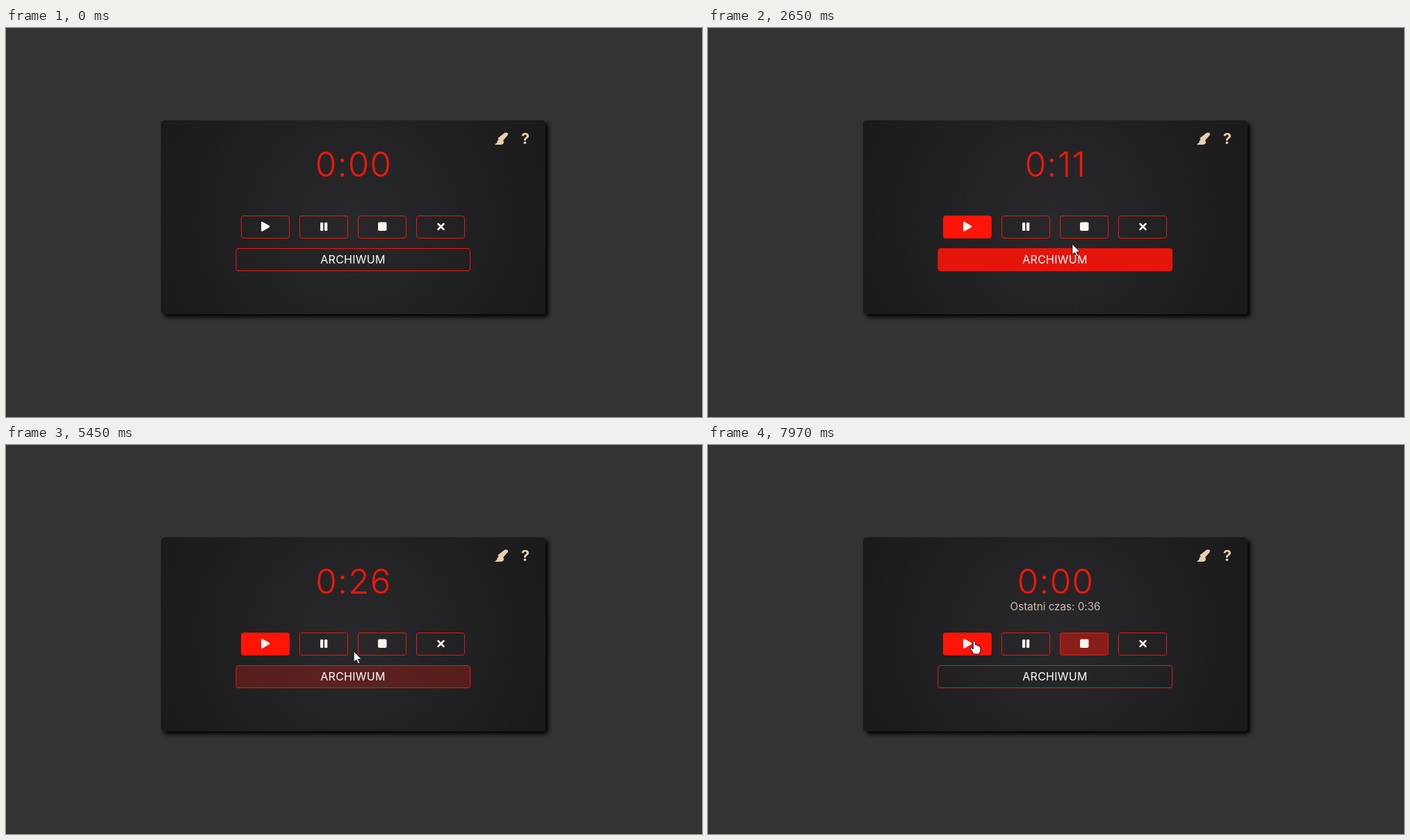
Animation of 1001x560 px, one loop 8000 ms. Source, as an HTML page:

```html
<!DOCTYPE html>
<html lang="pl">
<head>
<meta charset="utf-8">
<title>Stoper</title>
<style>
  html, body { margin: 0; width: 100%; height: 100%; overflow: hidden; background: #333; }
  svg { position: absolute; left: 0; top: 0; }
  text { font-family: Inter, sans-serif; text-anchor: middle; }
  #panel {
    position: absolute; left: 223px; top: 133px; width: 553px; height: 279px;
    border-radius: 5px; box-shadow: 4px 4px 6px #000;
    background: radial-gradient(circle, #29292c, #1a1a1a);
  }
  #clock { font-size: 49.5px; font-weight: 300; letter-spacing: 1.2px; fill: #f7160a; font-feature-settings: "calt" 0; }
  #last { font-size: 15.2px; fill: #cdbfae; font-feature-settings: "calt" 0; }
  #label { font-size: 16px; letter-spacing: .25px; fill: #fff; }
  .button { fill: #ff1408; stroke: #ee160c; }
  .icon { fill: #f8f4ee; }
  .tool { fill: #e8cfb2; }
  .cursor { fill: #fff; stroke: #111; stroke-width: 1; stroke-linejoin: round; }
</style>
</head>
<body>
<div id="panel"></div>
<svg width="1001" height="560" viewBox="0 0 1001 560">
  <g class="tool">
    <path d="M721 151q2 1 0 4l-7 8q-1 1-3 0l-3-3q-1-1 0-2l9-7q2-1 4 0z"/>
    <path d="M707.500 160.500q4 0 5 4q0 4-5 4h-7.500q-1-1 1-1.500q2-1 2-3q1-3.500 4.500-3.500z" transform="translate(3.500 -.500)"/>
    <text x="747" y="167" font-size="22" font-weight="700">?</text>
  </g>
  <text id="clock" x="500" y="214">0:00</text>
  <text id="last" x="499.500" y="238">Ostatni czas: 0:36</text>
  <g id="buttons"></g>
  <g class="icon">
    <path d="M367 280.500q0-2.500 2.300-1.300l9.300 5.300q1.600 1.200 0 2.400l-9.300 5.600q-2.300 1-2.300-1.300z"/>
    <rect x="452" y="280" width="4.300" height="12" rx="1.200"/>
    <rect x="458" y="280" width="4.300" height="12" rx="1.200"/>
    <rect x="535" y="279.500" width="12.500" height="12.500" rx="2"/>
    <path d="M621.500 282l8 8m0-8l-8 8" stroke="#f8f4ee" stroke-width="2.500" stroke-linecap="round"/>
  </g>
  <text id="label" x="499" y="339">ARCHIWUM</text>
  <g id="pointer">
    <path id="arrow" class="cursor" d="M0 0V15.500L3.600 12.200L6.300 18L8.800 16.900L6.200 11.300H11.200Z"/>
    <path id="hand" class="cursor" d="M-1.700 1.500Q0-1 1.700 1.500V6Q3.500 4.800 4.500 7Q6 6 7 8Q9 7.500 9 10V14Q8 16.500 7 19H-1Q-2 16-5 12.500Q-6.500 9.500-3.500 10L-1.700 12Z"/>
    <circle id="press" r="13" fill="#ff0" opacity=".52"/>
  </g>
</svg>
<script>
const LOOP = 8000, FADE = 300;
const $ = id => document.getElementById(id);

// Each button: box, then the spans of time in which it is lit.
const buttons = [
  { x: 338, y: 270, w: 70, h: 33, lit: [[950, 3190], [3530, 6390], [7600, 9000]] },
  { x: 422, y: 270, w: 70, h: 33, lit: [[2800, 4320]] },
  { x: 506, y: 270, w: 70, h: 33, lit: [[5500, 7873]] },
  { x: 590, y: 270, w: 70, h: 33, lit: [] },
  { x: 330.5, y: 317, w: 337.5, h: 33, lit: [[735, 845], [2290, 2633], [4860, 5300]] }
];

// Pointer tip: time, x, y
const path = [
  [260, 868, 543], [500, 690, 452], [700, 520, 361], [850, 430, 315], [1010, 386, 292],
  [1290, 384, 289], [1900, 384, 289], [2230, 430, 311], [2400, 475, 324], [2540, 512, 324],
  [2633, 523, 317], [2650, 524, 311], [2750, 506, 297], [2930, 462, 288], [3240, 462, 288],
  [3520, 408, 288], [3700, 386, 290], [3910, 380, 291], [4680, 380, 291], [4860, 412, 317],
  [5050, 455, 324], [5300, 493, 316], [5450, 500, 297], [5600, 526, 289], [5860, 543, 287],
  [7250, 543, 287], [7430, 500, 268], [7590, 408, 277], [7760, 388, 289], [7970, 383, 282]
];
const presses = [[1480, 1600], [3180, 3260], [4320, 4440], [6390, 6500], [7873, 7950]];

for (const b of buttons) {
  b.node = document.createElementNS("http://www.w3.org/2000/svg", "rect");
  const attrs = { class: "button", x: b.x + .5, y: b.y + .5, width: b.w - 1, height: b.h - 1, rx: 3 };
  for (const name in attrs) b.node.setAttribute(name, attrs[name]);
  $("buttons").append(b.node);
}

const clamp = v => Math.min(1, Math.max(0, v));
const ease = v => 1 - (1 - clamp(v)) ** 2;
const within = (t, [from, to]) => t >= from && t < to;
const show = (id, on) => $(id).style.display = on ? "" : "none";

function glow(spans, t) {
  return Math.max(0, ...spans.map(([on, off]) =>
    Math.min(ease((t - on) / FADE), 1 - ease((t - off) / FADE))));
}

function tipAt(t) {
  const i = path.findIndex(p => p[0] > t);
  if (i < 0) return path.at(-1).slice(1);
  if (i === 0) return path[0].slice(1);
  const a = path[i - 1], b = path[i], k = (t - a[0]) / (b[0] - a[0]);
  return [a[1] + (b[1] - a[1]) * k, a[2] + (b[2] - a[2]) * k];
}

function countAt(t) {
  if (t >= 6500) return 0;
  const ticks = (start, end) => Math.floor(Math.max(0, Math.min(t, end) - start) / 105);
  return ticks(1480, 3190) + ticks(4335, 6500);
}

function draw(t) {
  $("clock").textContent = "0:" + String(countAt(t)).padStart(2, "0");
  show("last", t >= 6500);
  for (const b of buttons) b.node.setAttribute("fill-opacity", glow(b.lit, t));

  const [x, y] = tipAt(t);
  const over = buttons.some(b => x >= b.x && x <= b.x + b.w && y >= b.y && y <= b.y + b.h);
  $("pointer").setAttribute("transform", `translate(${x} ${y})`);
  show("pointer", t >= path[0][0]);
  show("hand", over);
  show("arrow", !over);
  show("press", presses.some(p => within(t, p)));
}

const start = performance.now();
function frame() {
  draw((performance.now() - start) % LOOP);
  requestAnimationFrame(frame);
}
frame();
</script>
</body>
</html>
```
